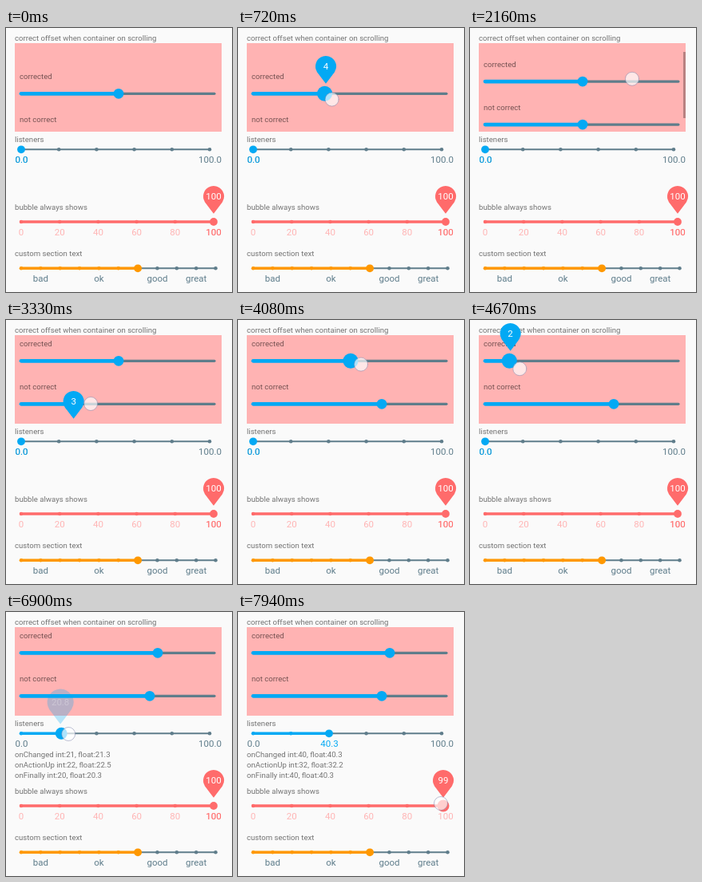
An HTML page with a canvas that plays this animation: 283x331 px, repeating every 8 s.

```html
<!DOCTYPE html>
<html lang="en">
<head>
<meta charset="utf-8">
<title>Seek bars</title>
<style>
  html, body { margin: 0; width: 100%; height: 100%; overflow: hidden; background: #fafafa; }
  canvas { display: block; width: 283px; height: 331px; }
</style>
</head>
<body>
<canvas></canvas>
<script>
const W = 283, H = 331, LOOP = 8000;
const BLUE = '#03a9f4', GREY = '#5f7d8b', CORAL = '#ff6b6b', PALE = '#ffb5b5', ORANGE = '#ff9800';
const TEXT = 'rgba(0,0,0,.54)';
const canvas = document.querySelector('canvas');
const ctx = canvas.getContext('2d');
const ratio = window.devicePixelRatio || 1;
canvas.width = W * ratio;
canvas.height = H * ratio;

const clamp = v => Math.max(0, Math.min(1, v));

// Value of [time, value] keys at t, eased with a half cosine between keys.
function at(keys, t) {
  if (t <= keys[0][0]) return keys[0][1];
  for (let i = 1; i < keys.length; i++) {
    const [t0, a] = keys[i - 1], [t1, b] = keys[i];
    if (t < t1) return a + (b - a) * (1 - Math.cos(Math.PI * (t - t0) / (t1 - t0))) / 2;
  }
  return keys[keys.length - 1][1];
}

const scrollKeys = [[1800, 0], [2530, 31]];
const paths = {
  corrected: [[200, 141], [1180, 82], [1577, 141], [4140, 141], [4730, 47], [5065, 236], [5250, 190]],
  uncorrected: [[3000, 141], [3400, 78], [3800, 180]],
  listeners: [[5920, 19], [6200, 112], [6350, 72], [6450, 67], [6850, 67], [7130, 95], [7200, 95], [7350, 114]],
  always: [[7820, 260], [7930, 257]]
};

// One entry per touch: dx and y place the finger relative to the thumb and the stage.
const touches = [
  { bar: 'corrected', from: 60, to: 1560, dx: [[0, 8], [1400, 10]], y: [[60, 86], [900, 90]] },
  { bar: 'uncorrected', from: 2880, to: 3860, dx: [[2880, 12], [3300, 24], [3600, 10]], y: [[0, 105]] },
  { bar: 'corrected', from: 4020, to: 5270, dx: [[0, 13]], y: [[4020, 55], [4400, 65], [5000, 56]] },
  { bar: 'listeners', from: 5880, to: 6360, dx: [[0, 9]], y: [[0, 153]] },
  { bar: 'listeners', from: 6770, to: 7200, dx: [[0, 9]], y: [[0, 153]] },
  { bar: 'always', from: 7770, to: 8000, dx: [[0, -3]], y: [[0, 240]] }
];

const isDragging = (bar, t) => touches.some(d => d.bar === bar && t >= d.from + 50 && t < d.to);

function bubbleAlpha(bar, t) {
  return Math.max(0, ...touches.filter(d => d.bar === bar).map(d => {
    const hide = bar === 'listeners' ? 200 : 90;
    return Math.min(clamp((t - d.from - 90) / 150), clamp((d.to + hide - t) / 90));
  }));
}

function label(text, x, y, color = TEXT, size = 9.6, align = 'left') {
  ctx.font = `${size}px Roboto, sans-serif`;
  ctx.textAlign = align;
  ctx.fillStyle = color;
  ctx.fillText(text, x, y);
}

const mark = (text, x, y, color) => label(text, x, y, color, 11.5, 'center');

function dot(x, y, r, color) {
  ctx.fillStyle = color;
  ctx.beginPath();
  ctx.arc(x, y, r, 0, 7);
  ctx.fill();
}

function line(x0, x1, y, width, color) {
  ctx.strokeStyle = color;
  ctx.lineWidth = width;
  ctx.lineCap = 'round';
  ctx.beginPath();
  ctx.moveTo(x0, y);
  ctx.lineTo(x1, y);
  ctx.stroke();
}

function bar({ end, y, x, color, rest = GREY, thick, thin, r, sections = 0 }) {
  line(x, end, y, thin, rest);
  line(19, x, y, thick, color);
  for (let i = 0; sections && i <= sections; i++) {
    const tick = 19 + (end - 19) * i / sections;
    dot(tick, y, 2.3, tick <= x + .5 ? color : rest);
  }
  dot(x, y, r, color);
}

function bubble(x, y, r, text, color, alpha = 1) {
  if (!alpha) return;
  const side = r * Math.sqrt(3) / 2;
  ctx.globalAlpha = alpha;
  ctx.fillStyle = color;
  ctx.beginPath();
  ctx.moveTo(x, y + r * 5 / 3);
  ctx.quadraticCurveTo(x - side - 1.5, y + r / 2 - 1.5, x - side, y + r / 2);
  ctx.arc(x, y, r, Math.PI * 5 / 6, Math.PI / 6);
  ctx.quadraticCurveTo(x + side + 1.5, y + r / 2 - 1.5, x, y + r * 5 / 3);
  ctx.fill();
  mark(text, x, y + 4, '#fff');
  ctx.globalAlpha = 1;
}

function finger(x, y) {
  dot(x, y, 8.5, 'rgba(255,255,255,.68)');
  ctx.strokeStyle = 'rgba(125,130,170,.5)';
  ctx.lineWidth = 1;
  ctx.stroke();
}

function drawScrollBox(t, scroll) {
  ctx.save();
  ctx.beginPath();
  ctx.rect(11, 19, 259, 111);
  ctx.clip();
  ctx.fillStyle = '#ffb3b3';
  ctx.fillRect(11, 19, 259, 111);
  [['corrected', 'corrected', 64], ['uncorrected', 'not correct', 118]].forEach(([name, title, base]) => {
    label(title, 17, base - scroll);
    bar({
      end: 261, y: base + 18.3 - scroll, x: at(paths[name], t), color: BLUE,
      thick: 4.8, thin: 3.2, r: isDragging(name, t) ? 9.5 : 6.4
    });
  });
  const shown = Math.min(clamp((t - 1790) / 60), clamp((3120 - t) / 250));
  ctx.fillStyle = `rgba(0,0,0,${.28 * shown})`;
  ctx.fillRect(267, 19 + scroll * .72, 3, 83);
  ctx.restore();
}

const percent = x => (x - 19) / 236 * 100;

function drawListeners(t) {
  const x = at(paths.listeners, t), value = percent(x);
  const dragging = isDragging('listeners', t);
  label('listeners', 11, 143);
  bar({ end: 255, y: 152.3, x, color: BLUE, thick: 3.5, thin: 2, r: dragging ? 7.5 : 4.9, sections: 5 });
  mark('0.0', 19.5, 169, GREY);
  mark('100.0', 255.5, 169, GREY);
  if (!dragging) mark(value.toFixed(1), x + .5, 169, BLUE);

  const report = (event, v, y) =>
    label(`${event} int:${Math.round(v)}, float:${v.toFixed(1)}`, 11, y);
  const valueAt = time => percent(at(paths.listeners, time));
  if (t > 5950) report('onChanged', value, 182);
  if (t >= 6360) report('onActionUp', valueAt(t < 7200 ? 6350 : 7200), 195);
  if (t >= 6450) report('onFinally', valueAt(t < 7350 ? 6450 : 7350), 208);
}

function drawAlways(t) {
  const x = at(paths.always, t), dragging = isDragging('always', t);
  label('bubble always shows', 11, 228);
  bar({ end: 260, y: 243, x, color: CORAL, rest: CORAL, thick: 3.6, thin: 3.6, r: dragging ? 7.5 : 4.9, sections: 5 });
  for (let i = 0; i <= 5; i++) mark(i * 20, 19 + i * 48.2, 259.5, PALE);
  if (!dragging) mark('100', 260, 259.5, CORAL);
  bubble(x, 211, 13, Math.round((x - 19) / 2.41), CORAL);
}

function drawSections() {
  label('custom section text', 11, 286);
  bar({ end: 262.5, y: 301.3, x: 165.1, color: ORANGE, thick: 3.6, thin: 2, r: 4.9, sections: 10 });
  [['bad', 1], ['ok', 4], ['good', 7], ['great', 9]].forEach(([text, i]) =>
    mark(text, 19 + i * 24.35, 318, GREY));
}

function draw(t) {
  const scroll = at(scrollKeys, t);
  ctx.setTransform(ratio, 0, 0, ratio, 0, 0);
  ctx.fillStyle = '#fafafa';
  ctx.fillRect(0, 0, W, H);
  label('correct offset when container on scrolling', 11, 16);
  drawScrollBox(t, scroll);
  drawListeners(t);
  drawAlways(t);
  drawSections();

  // Bubbles trail their thumbs slightly; the second one ignores the scroll.
  [['corrected', 48 - scroll], ['uncorrected', 102]].forEach(([name, y]) => {
    const x = at(paths[name], t - 15);
    bubble(x, y, 13, Math.floor(1 + 9 * (x - 19) / 243), BLUE, bubbleAlpha(name, t));
  });
  const x = at(paths.listeners, t - 15);
  bubble(x, 113, 16.5, percent(x).toFixed(1), BLUE, bubbleAlpha('listeners', t));

  touches.forEach(d => {
    if (t >= d.from && t < d.to) finger(at(paths[d.bar], t) + at(d.dx, t), at(d.y, t));
  });
  if (t >= 1710 && t < 2550) finger(203, 79 - scroll);
}

function tick() {
  draw(performance.now() % LOOP);
  requestAnimationFrame(tick);
}
tick();
</script>
</body>
</html>
```
